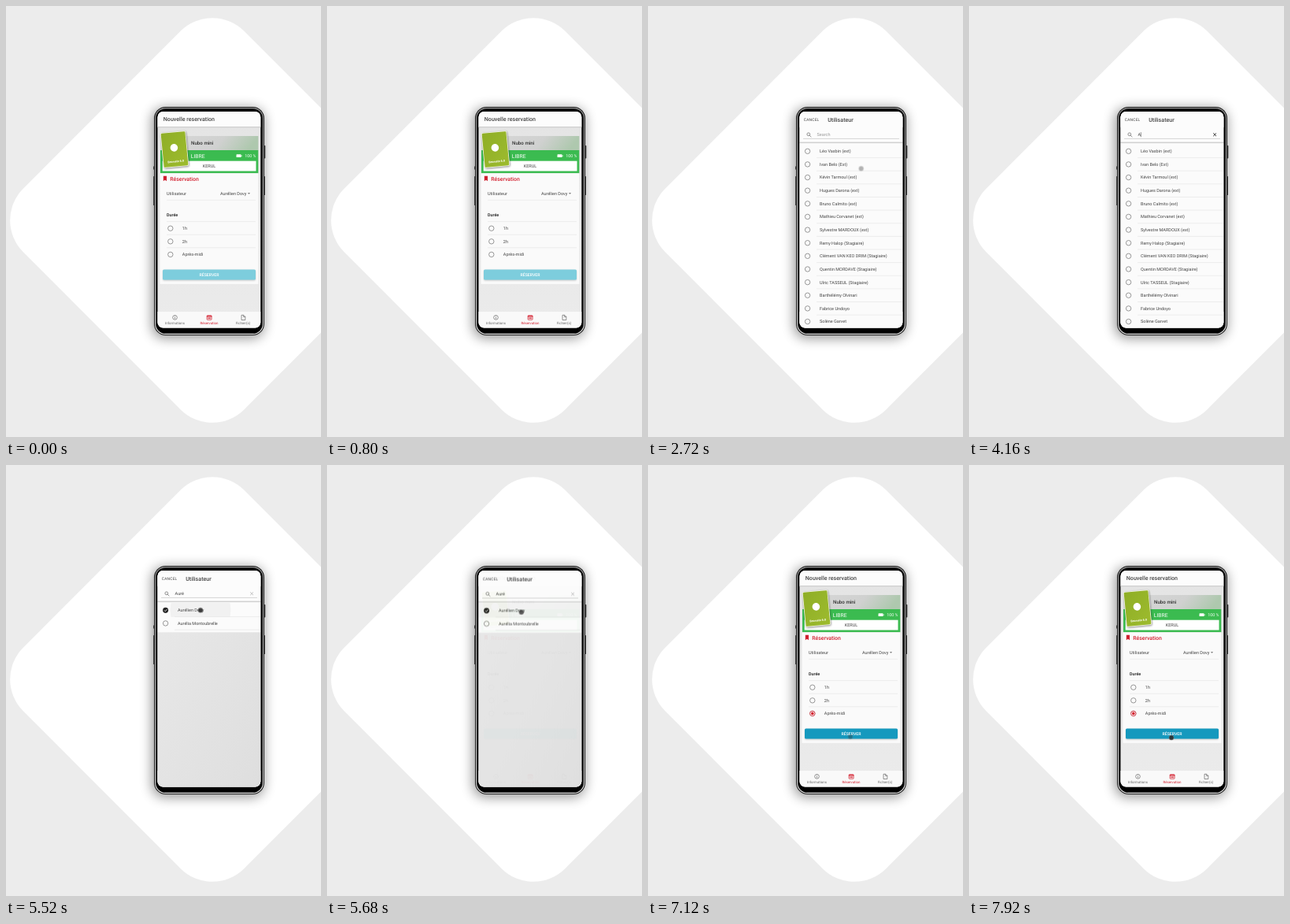
Write an HTML page that moves like this. It is 400 px wide and 547 px high and loops after 8000 ms.

```html
<!DOCTYPE html>
<html lang="fr">
<head>
<meta charset="utf-8">
<title>Réservation</title>
<style>
html, body { margin: 0; width: 100%; height: 100%; overflow: hidden; background: #ececec; }
svg { display: block; width: 100%; height: 100%; }
text { font: 5.5px Roboto, Arial, sans-serif; fill: #444; text-rendering: geometricPrecision; white-space: pre; }
.title { font-size: 7.1px; font-weight: 500; fill: #444; }
.mid { text-anchor: middle; }
.end { text-anchor: end; }
.tab { font-size: 4.4px; fill: #666; text-anchor: middle; }
.line { stroke: #e2e2e2; stroke-width: .6; }
.ring { fill: none; stroke: #777; stroke-width: .75; }
.icon { fill: none; stroke: #666; stroke-width: .7; }

/* one loop = 8 s, so 1% = 80 ms */
.a { animation: 8s linear infinite both; }

#list { animation-name: slide, fade; }
@keyframes slide {
  0%, 23.6% { transform: translateY(14.6px); animation-timing-function: cubic-bezier(.36,.66,.04,1); }
  27.1%, 70.5% { transform: none; animation-timing-function: cubic-bezier(.47,0,.745,.715); }
  73.5%, 100% { transform: translateY(14.6px); }
}
@keyframes fade {
  0%, 23.8% { opacity: 0; }
  25.6%, 70.5% { opacity: 1; animation-timing-function: cubic-bezier(.47,0,.745,.715); }
  73.5%, 100% { opacity: 0; }
}
#veil { animation-name: veil; }
@keyframes veil { 0%, 23.8% { opacity: 0; } 25% { opacity: .06; } 28%, 100% { opacity: 0; } }

#hint { animation-name: hint; }
@keyframes hint { 0%, 45.9% { opacity: 1; } 46%, 100% { opacity: 0; } }
.k1 { animation-name: k1; }
.k2 { animation-name: k2; }
.k3 { animation-name: k3; }
.k4 { animation-name: k4; }
@keyframes k1 { 0%, 45.9% { fill-opacity: 0; } 46%, 100% { fill-opacity: 1; } }
@keyframes k2 { 0%, 53.9% { fill-opacity: 0; } 54%, 100% { fill-opacity: 1; } }
@keyframes k3 { 0%, 55.9% { fill-opacity: 0; } 56%, 100% { fill-opacity: 1; } }
@keyframes k4 { 0%, 57.9% { fill-opacity: 0; } 58%, 100% { fill-opacity: 1; } }

#caret { animation-name: caret; animation-timing-function: step-end; }
@keyframes caret {
  0% { opacity: 0; transform: none; }
  42% { opacity: 1; transform: none; }
  46% { opacity: 1; transform: translateX(3.8px); }
  54% { opacity: 1; transform: translateX(6.8px); }
  56% { opacity: 1; transform: translateX(8.6px); }
  58% { opacity: 1; transform: translateX(11.5px); }
  60%, 100% { opacity: 0; transform: translateX(11.5px); }
}
#clear { animation-name: clear; }
@keyframes clear { 0%, 46% { opacity: 0; } 49%, 60% { opacity: 1; } 64%, 100% { opacity: .3; } }

#all { animation-name: all; }
#found { animation-name: found; }
@keyframes all { 0%, 60.4% { opacity: 1; } 60.5%, 100% { opacity: 0; } }
@keyframes found { 0%, 60.4% { opacity: 0; } 60.5%, 100% { opacity: 1; } }
#tick { animation-name: tick; }
@keyframes tick { 0%, 68.9% { opacity: 0; } 69%, 100% { opacity: 1; } }
#ripple { animation-name: ripple; }
@keyframes ripple {
  0%, 68.4% { r: 0; opacity: .04; }
  69% { r: 38px; opacity: .04; }
  70.5% { r: 80px; opacity: .04; }
  73%, 100% { r: 80px; opacity: 0; }
}

#pick { animation-name: pick; }
@keyframes pick { 0%, 80.9% { opacity: 0; } 82%, 100% { opacity: 1; } }
#book { animation-name: book; }
@keyframes book { 0%, 81% { fill: #7dcddd; } 84%, 100% { fill: #1599be; } }

#move { animation-name: move; animation-timing-function: ease-in-out; }
@keyframes move {
  0%, 18% { transform: translate(281px,243px); }
  22%, 25.5% { transform: translate(281px,238px); }
  30%, 32% { transform: translate(281px,226px); }
  38% { transform: translate(237px,142px); }
  40%, 43% { transform: translate(246px,161px); }
  43.1%, 61% { transform: translate(256px,196px); }
  66%, 70.5% { transform: translate(247px,184.3px); animation-timing-function: ease-in; }
  75% { transform: translate(237px,296px); animation-timing-function: linear; }
  76% { transform: translate(246px,308px); animation-timing-function: linear; }
  77% { transform: translate(266px,324px); }
  78%, 83% { transform: translate(254.5px,315.5px); }
  90%, 100% { transform: translate(257px,346px); }
}
#dot { animation-name: dot; }
@keyframes dot {
  0%, 18% { opacity: 0; }
  22% { opacity: .35; }
  23%, 25.5% { opacity: .9; }
  29%, 40% { opacity: .35; }
  41%, 42% { opacity: .9; }
  43%, 62% { opacity: 0; }
  66%, 68.5% { opacity: .35; }
  69%, 70.5% { opacity: .9; }
  73%, 79% { opacity: .28; }
  80.5%, 82% { opacity: .9; }
  84%, 97% { opacity: .35; }
  99%, 100% { opacity: .9; }
}
</style>
</head>
<body>
<svg viewBox="0 0 400 547">
  <defs>
    <clipPath id="screen"><rect x="192.5" y="134" width="130.8" height="274.5" rx="7"/></clipPath>
    <clipPath id="row1"><rect x="192" y="175" width="132" height="18"/></clipPath>
    <linearGradient id="grey" x1="0" y1="0" x2="1" y2="1">
      <stop offset="0" stop-color="#e9e9e9"/><stop offset="1" stop-color="#dedede"/>
    </linearGradient>
    <linearGradient id="page" x1="0" y1="0" x2="0" y2="1">
      <stop offset="0" stop-color="#e4e4e4"/><stop offset="1" stop-color="#ebebeb"/>
    </linearGradient>
    <linearGradient id="band" x1="0" y1="0" x2="1" y2=".12">
      <stop offset="0" stop-color="#d8d8d8"/><stop offset=".65" stop-color="#d0d1d0"/><stop offset="1" stop-color="#aec8ae"/>
    </linearGradient>
    <linearGradient id="lime" x1="0" y1="0" x2="1" y2="1">
      <stop offset="0" stop-color="#8fae26"/><stop offset="1" stop-color="#9dbb2e"/>
    </linearGradient>
    <linearGradient id="rim" x1="0" y1="0" x2="0" y2="1">
      <stop offset="0" stop-color="#999"/><stop offset=".5" stop-color="#ccc"/><stop offset="1" stop-color="#e6e6e6"/>
    </linearGradient>
    <filter id="blur" x="-30%" y="-30%" width="160%" height="160%"><feGaussianBlur stdDeviation="7.5"/></filter>
    <filter id="soft" x="-30%" y="-30%" width="160%" height="160%"><feGaussianBlur stdDeviation="1"/></filter>
  </defs>

  <rect width="400" height="547" fill="#ececec"/>
  <rect x="63.7" y="73.7" width="396.6" height="396.6" rx="57" fill="#fff" transform="rotate(45 262 272)"/>

  <!-- phone -->
  <rect x="185" y="129" width="143" height="293" rx="16" opacity=".4" filter="url(#blur)"/>
  <g fill="#444">
    <rect x="187" y="203.5" width="1.4" height="4"/>
    <rect x="187" y="216" width="1.4" height="37" rx=".6"/>
    <rect x="327.7" y="177" width="1.7" height="16.5" rx=".7"/>
    <rect x="327.7" y="216" width="1.3" height="24" rx=".6"/>
  </g>
  <rect x="188" y="128" width="140" height="290" rx="14.5" fill="#1d1d1d"/>
  <rect x="189.6" y="129.6" width="136.8" height="286.8" rx="13" fill="#000" stroke="url(#rim)" stroke-width="1.1"/>

  <g clip-path="url(#screen)">
    <!-- booking page -->
    <rect x="192" y="134" width="132" height="275" fill="url(#page)"/>
    <rect x="192" y="134" width="132" height="19.5" fill="#fcfcfc"/>
    <rect x="192" y="153.3" width="132" height=".9" fill="#c4c4c4"/>
    <text class="title" x="199.8" y="146.4">Nouvelle reservation</text>

    <rect x="196" y="165" width="124.3" height="18.5" fill="url(#band)"/>
    <text x="235" y="176.4" style="font-size:6.2px;font-weight:500;fill:#333">Nubo mini</text>
    <rect x="196" y="183" width="124.3" height="29.3" fill="#3bbb50"/>
    <text x="234.8" y="192.7" style="font-size:6.8px;fill:#fff">LIBRE</text>
    <rect x="292.5" y="188.3" width="6" height="3.8" rx=".6" fill="#fff"/>
    <rect x="298.7" y="189.3" width=".8" height="1.8" fill="#fff"/>
    <text class="end" x="317.4" y="192.2" style="font-size:5.3px;fill:#fff">100 %</text>
    <rect x="198.7" y="196.7" width="118.8" height="12.8" fill="#fff"/>
    <text class="mid" x="258" y="205.1">KERUL</text>

    <rect x="195.5" y="212.3" width="125" height="140.5" fill="#fafafa"/>
    <g transform="rotate(-5.5 214 182)">
      <rect x="198.6" y="160.6" width="32" height="45" rx="1.8" opacity=".45" filter="url(#soft)"/>
      <rect x="197.8" y="159.6" width="32.4" height="44.8" rx="1.8" fill="#f1f4e2"/>
      <rect x="198.6" y="160.4" width="30.8" height="43.2" rx="1.3" fill="url(#lime)"/>
      <circle cx="213.6" cy="179.8" r="4.8" fill="#fff"/>
      <text class="mid" x="214.3" y="198.6" style="font-size:3.8px;font-weight:700;fill:#fff">Brumelo 6.0</text>
    </g>

    <path d="M199.8 215.8h4.2v6.4l-2.1-1.5-2.1 1.5z" fill="#cf1f2e"/>
    <text x="208.2" y="221.5" style="font-size:6.9px;font-weight:500;fill:#d3202f">Réservation</text>
    <text x="204" y="239.6">Utilisateur</text>
    <text class="end" x="305.3" y="239.6">Aurélien Dovy</text>
    <path d="M307 237.2h3l-1.5 1.6z" fill="#555"/>
    <path class="line" d="M204 246.3h113M204 273.6h113M204 290.2h113M204 306.8h113"/>
    <text x="204" y="267.2" style="font-size:5.4px;font-weight:700;fill:#333">Durée</text>
    <circle class="ring" cx="208.8" cy="282.2" r="3.2"/>
    <text x="223.8" y="284.2">1h</text>
    <circle class="ring" cx="208.8" cy="298.8" r="3.2"/>
    <text x="223.8" y="300.8">2h</text>
    <circle class="ring" cx="208.8" cy="315.4" r="3.2"/>
    <g id="pick" class="a">
      <circle cx="208.8" cy="315.4" r="3.2" fill="#fafafa" stroke="#d3202f" stroke-width=".8"/>
      <circle cx="208.8" cy="315.4" r="1.8" fill="#d3202f"/>
    </g>
    <text x="223.8" y="317.4">Après-midi</text>
    <rect x="199.2" y="335.4" width="117.6" height="13" rx="1.5" opacity=".2" filter="url(#soft)"/>
    <rect id="book" class="a" x="199" y="334.6" width="118" height="12.8" rx="1.5" fill="#7dcddd"/>
    <text class="mid" x="258" y="342.8" style="font-size:5.2px;font-weight:500;fill:#fff">RÉSERVER</text>

    <rect x="192" y="388" width="132" height="21" fill="#f9f9f9"/>
    <g class="icon">
      <circle cx="214.5" cy="395.3" r="2.8"/>
      <path d="M214.5 394.9v2M214.5 393.4v.8"/>
      <path d="M299 392.3h2.8l2 2v4.2h-4.8zM301.6 392.4v2.1h2.1"/>
    </g>
    <rect x="255.2" y="392.8" width="5.8" height="5.4" rx=".5" fill="none" stroke="#d3202f" stroke-width=".8"/>
    <path d="M255 393.8h6.2M256.4 396.2h3.4" stroke="#d3202f" stroke-width="1.2"/>
    <text class="tab" x="214.5" y="404">Informations</text>
    <text class="tab" x="258" y="404" style="fill:#d3202f">Réservation</text>
    <text class="tab" x="301" y="404">Fichier(s)</text>

    <!-- user list -->
    <g id="list" class="a">
      <rect x="192" y="134" width="132" height="275" fill="url(#grey)"/>
      <g id="all" class="a"><rect x="192" y="173" width="132" height="250" fill="#fbfbfb"/></g>
      <g id="found" class="a">
        <rect x="192" y="173" width="132" height="39.3" fill="#fbfbfb"/>
        <circle id="ripple" class="a" cx="247" cy="184.3" r="0" clip-path="url(#row1)"/>
      </g>
      <g id="tick" class="a">
        <circle cx="202.6" cy="184.3" r="3.4" fill="#222"/>
        <path d="M200.9 184.4l1.3 1.3 2.3-2.6" fill="none" stroke="#fff" stroke-width=".8"/>
      </g>
      <rect x="192" y="134" width="132" height="39" fill="#fcfcfc"/>
      <rect x="192" y="172.6" width="132" height="1.5" fill="#d0d0d0"/>
      <text x="197.8" y="146" style="font-size:4.9px;letter-spacing:.2px">CANCEL</text>
      <text class="title" x="228.2" y="146.6">Utilisateur</text>
      <circle class="icon" cx="203.8" cy="162.8" r="1.9"/>
      <path class="icon" d="M205.2 164.2l2.1 2.1"/>
      <path d="M197 168.4h122" stroke="#bbb" stroke-width=".6"/>
      <text id="hint" class="a" x="214.6" y="165.2" style="fill:#999">Search</text>
      <text x="214.6" y="165.2"><tspan class="a k1">A</tspan><tspan class="a k2">u</tspan><tspan class="a k3">r</tspan><tspan class="a k4">é</tspan></text>
      <rect id="caret" class="a" x="214.3" y="160.2" width=".6" height="6" fill="#444"/>
      <path id="clear" class="a" d="M310.2 161.4l3.8 3.8M314 161.4l-3.8 3.8" stroke="#222" stroke-width=".9"/>
    </g>
    <rect id="veil" class="a" x="192" y="134" width="132" height="275"/>
  </g>

  <g id="move" class="a"><circle id="dot" class="a" r="3.1" fill="#2c2c2c" stroke="#888" stroke-width=".5"/></g>
</svg>
<script>
const people = [
  "Léo Vasbin (ext)", "Ivan Belo (Ext)", "Kévin Tarmoul (ext)", "Hugues Darona (ext)",
  "Bruno Calmito (ext)", "Mathieu Corvanet (ext)", "Sylvestre MARDOUX (ext)",
  "Remy Halop (Stagiaire)", "Clément VAN KEO DRIM (Stagiaire)", "Quentin MORDAVE (Stagiaire)",
  "Ulric TASSEUL (Stagiaire)", "Barthélémy Olvinari", "Fabrice Undoyo", "Solène Garvet"
];
const matches = ["Aurélien Dovy", "Aurélia Montoubrelle"];

function add(parent, tag, attrs, text = "") {
  const node = document.createElementNS("http://www.w3.org/2000/svg", tag);
  for (const key in attrs) node.setAttribute(key, attrs[key]);
  node.textContent = text;
  parent.append(node);
}

function fill(id, names) {
  const box = document.getElementById(id);
  names.forEach((name, i) => {
    const y = 184.3 + i * 16.63;
    add(box, "circle", { class: "ring", cx: 202.6, cy: y, r: 3.2 });
    add(box, "text", { x: 218, y: y + 1.9 }, name);
    add(box, "path", { class: "line", d: `M214 ${y + 8.3}h109` });
  });
}

fill("all", people);
fill("found", matches);

// the filled check sits above the first matching row
document.getElementById("found").after(document.getElementById("tick"));
</script>
</body>
</html>
```
